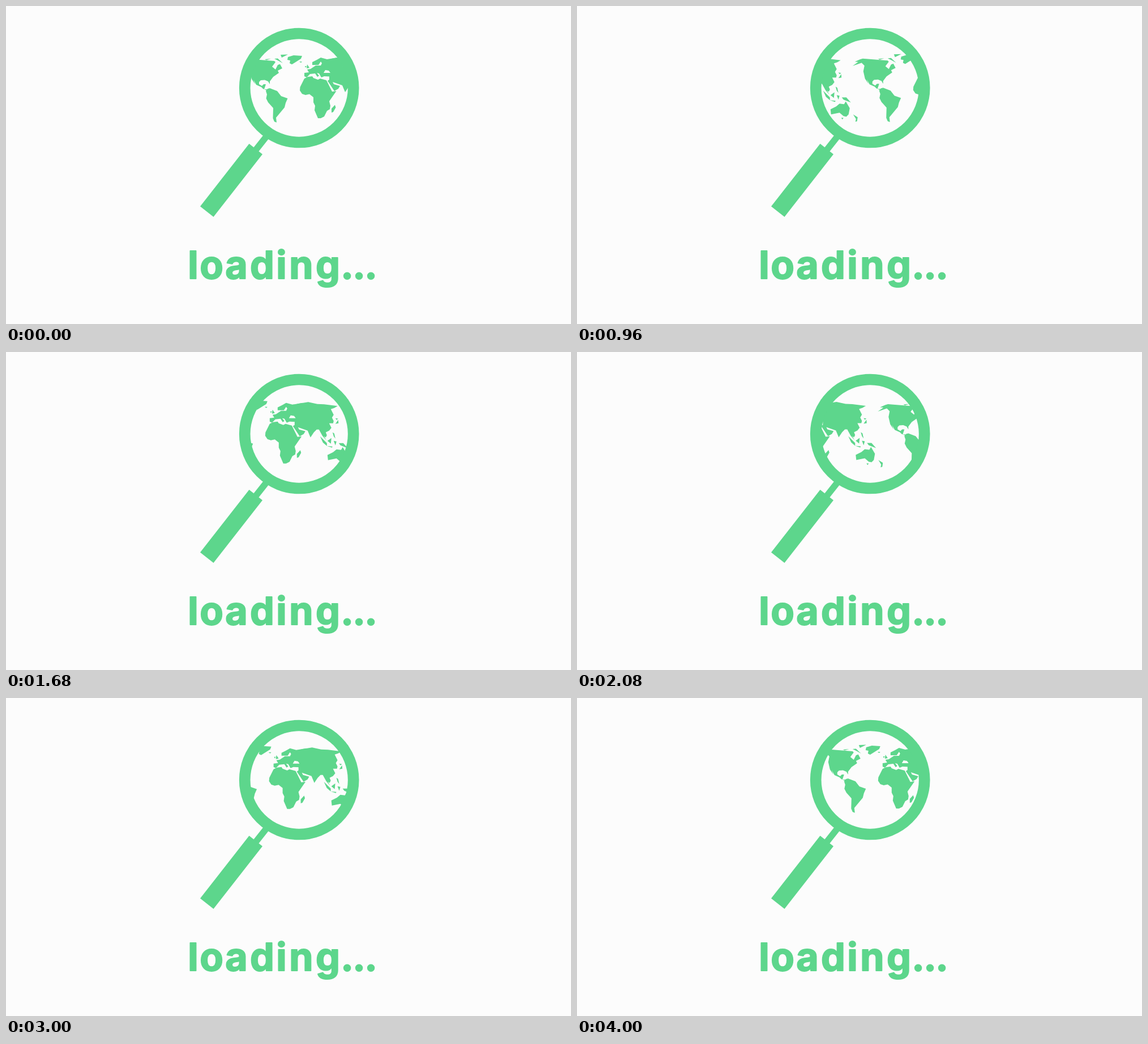
Animation of 998x561 px, one loop 4.04 s. Source, as an HTML page:

```html
<!DOCTYPE html>
<html lang="en">
<head>
<meta charset="utf-8">
<title>Loading</title>
<style>
  html, body { margin: 0; width: 100%; height: 100%; overflow: hidden; background: #fcfcfc; }
  svg { display: block; width: 998px; height: 561px; fill: #5dd68c; }
  text { font: 700 68px Inter, "Open Sans", sans-serif; text-anchor: middle; stroke: #5dd68c; stroke-width: 2; stroke-linejoin: round; }
</style>
</head>
<body>
<svg viewBox="0 0 998 561">
  <defs>
    <clipPath id="lens"><circle cx="517.7" cy="144.5" r="87"/></clipPath>
    <g id="world" fill-rule="evenodd">
      <!-- North America -->
      <path d="M412 106.5L422 99.5 416 99 425 95 430 93.5 455 95.5 474 97 476 99 470 107 476 112 480 104 484 102.5 488 110 480 114 482 118 472 125 466 133 466 138 463 133 457 130.5 450 131 447 134 447 138 452 141 455 138 459 138 456 147 466 147 463 150 454 146 451 143 442 139 437 130 440 138 434 129 431 116 433 106 428 101Z"/>
      <!-- Arctic islands, Greenland, Iceland -->
      <path d="M457 94L468 93 460 95.5ZM474 93L480 92.5 489 101 482 97ZM485 86L498 85.5 487 91ZM498 90L508 87 523 88 521 93 505 103 501 101 502 96 497 95ZM518 98L523 98 521 100Z"/>
      <!-- South America -->
      <path d="M466 145L479 150 486 159 497.5 163 494 171 492 179 477 197 478 205.5 474 204 471.5 198 472 180 463 170 459.5 163 461 156 459 150 462 146Z"/>
      <!-- Africa and Madagascar -->
      <path d="M527 128L533 125 541 124 543 127 551 130 555 128 566 131 576 151 583.5 150 571 168 573 176 572 182 567 185 562 195 556 198 551 198 545 184 546 176 543 170 543 161 536 155.5 529 157 523 155 519 149 519.5 143ZM581 174.5L582.5 179 578 187 575 188 575 181Z"/>
      <!-- Europe with the Black Sea -->
      <path d="M527 118L535 117 532 112 538 111 547 105 556 105 558 101 556 98 552 104 541 104 541 99 549 95 556 91 567 94 585 91 585 125 562 124 557 126 553 119 549 118 553 123 550 125 546 119 537 120 531 126 527 124ZM561 118L564 113 570 114 573 118Z"/>
      <!-- Asia -->
      <path d="M567 96L577 92.5 595 89.5 611 93 623 93.5 647 96.5 641 100 635 102 640 112 637 117 640 123 639 127 632 127 636 135 632 140 626 143 628 148 626 152 623 150 627 157 620 149 614 138 610 138 605 143 599 152 594 140 577 134 579 138 590 141 587 146 580 150 568 132 571 130 571 122 573 118Z"/>
      <!-- British Isles, Japan, Philippines -->
      <path d="M532 103L536 109 531 110ZM528 106L531 106 529 109ZM643 118L648 119 645 121ZM648 121L648.5 127 643 128ZM638 143L641 145 643 154 640 150Z"/>
      <!-- Indonesia and New Guinea -->
      <path d="M616 150L628 162 628 167 621 161ZM628 167L638 168 637 170ZM629 158L636 153 635 163ZM640 158L645 159 643 166ZM649 162L657 162 665 171 652 166Z"/>
      <!-- Australia, Tasmania, New Zealand -->
      <path d="M629 183L639 178 645 173 653 174 656 169 663 181 661 192 657 196 652 195 645 189 630 192ZM648 198L652 198 650 201ZM669 192L677 197 676 204 673 205 674 200Z"/>
    </g>
  </defs>
  <g clip-path="url(#lens)">
    <g id="strip"><use href="#world"/><use href="#world" x="256"/></g>
  </g>
  <circle cx="517.7" cy="144.5" r="96" fill="none" stroke="#5dd68c" stroke-width="19.7"/>
  <path d="M456 226L465 233 446 257 437 250ZM429.5 243L453 261.5 366.5 372 343 353.5Z"/>
  <text y="481" x="330.5 363 407 452.5 486.5 521.5 568.5 602.5 623.5 644.5">loading...</text>
</svg>
<script>
  const LOOP = 4040, STEP = 40, SPAN = 256, SPEED = 0.1888, RISE = 0.00075;
  const strip = document.getElementById('strip');

  function draw(now) {
    const t = Math.floor(now % LOOP / STEP) * STEP;
    strip.setAttribute('transform', `translate(${-t * SPEED % SPAN} ${-t * RISE})`);
    requestAnimationFrame(draw);
  }
  draw(performance.now());
</script>
</body>
</html>
```
